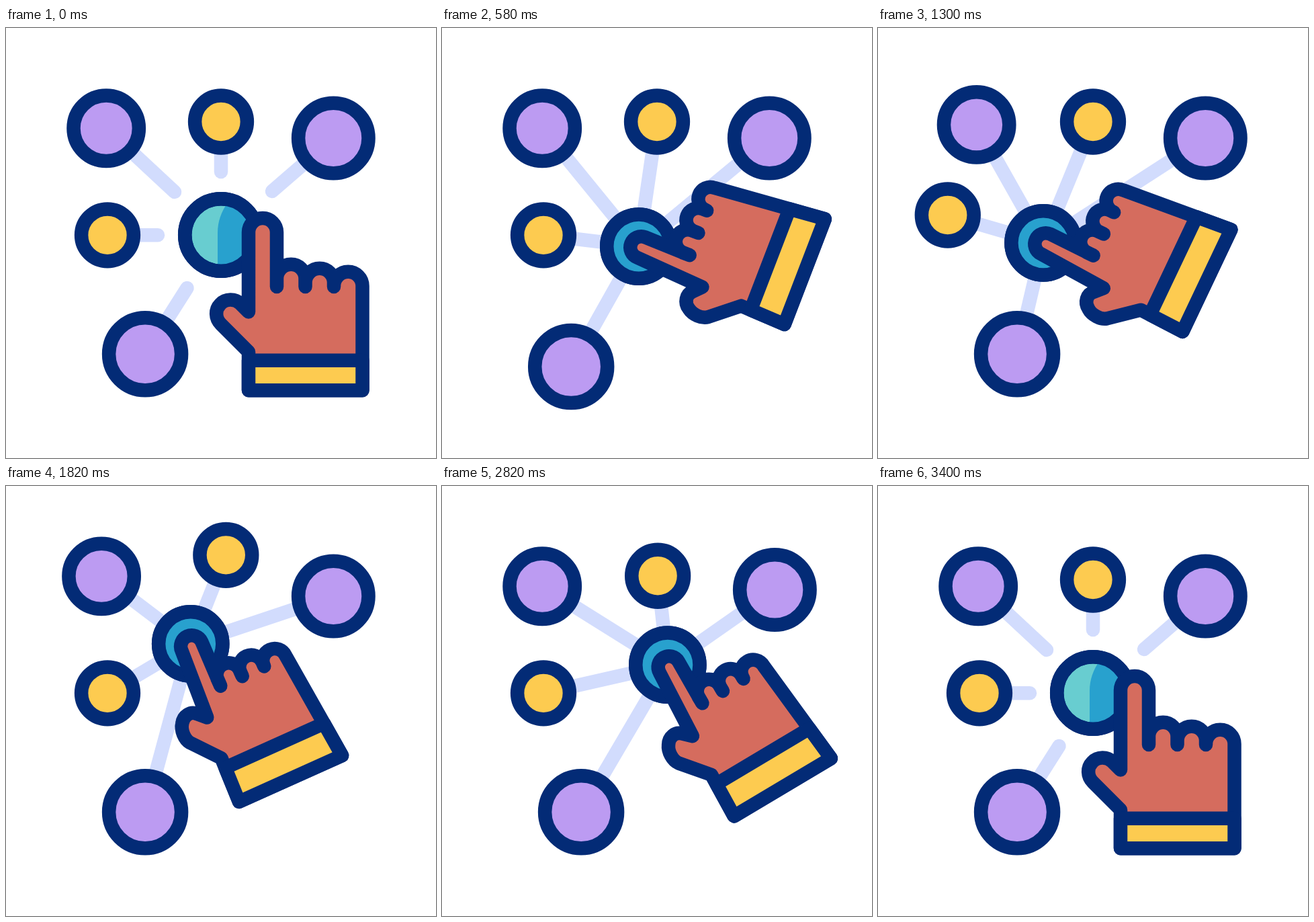
Recreate the animation shown at these times as an HTML page with a canvas. Size 640 px wide and 640 px high, loop 3600 ms.

```html
<!DOCTYPE html>
<html lang="en">
<head>
<meta charset="utf-8">
<title>Drag the hub</title>
<style>
  html, body { margin: 0; height: 100%; overflow: hidden; background: #fff; }
  canvas { display: block; }
</style>
</head>
<body>
<canvas id="stage" width="640" height="640"></canvas>
<script>
const ctx = document.getElementById('stage').getContext('2d');
const LOOP = 3600;
const NAVY = '#032b76', PURPLE = '#bc9bf2', YELLOW = '#fdcb50', RED = '#d56c5e';
const SPOKE = '#d2dcfd', TEAL = '#68cdd0', BLUE = '#28a1ce';
const LINE = 20.5;

// Nodes: rest place, radius, spoke end at rest, push vector, push start / peak / end
const nodes = [
  { x: 149.2, y: 149.2, r: 48.7, fill: PURPLE, end: [251, 244], push: [-17, -35.5], times: [1200, 1600, 2000] },
  { x: 320, y: 139.5, r: 38.9, fill: YELLOW, end: [320, 214], push: [12.6, -63], times: [1600, 2000, 3020] },
  { x: 487.3, y: 164, r: 52.2, fill: PURPLE, end: [396, 243], push: [39.5, -46.5], times: [2000, 2400, 3000] },
  { x: 151, y: 308.3, r: 38.9, fill: YELLOW, end: [226, 308.3], push: [-55.5, -35], times: [800, 1200, 1600] },
  { x: 207.1, y: 485.3, r: 54, fill: PURPLE, end: [269.5, 387], push: [-35, 44], times: [400, 800, 1200] }
];

// Hub path: time, x, y, hand angle in degrees
const keys = [
  [0, 320, 308, 0], [400, 320, 308, -72], [580, 293, 325, -69], [800, 258, 360, -67.5],
  [1060, 243, 352, -67], [1300, 246, 320, -64.65], [1600, 228, 250, -47],
  [1820, 274.5, 235, -24.3], [2000, 325, 222, -3], [2300, 399, 208, 23],
  [2420, 404, 210, 25], [2820, 336, 266, -30.7], [3000, 322, 300, -45], [3400, 320, 308, 0]
];

// Hand outlines around the hub centre: at rest and pressing
const hand = [
  'M41 231.2L41 174L0 133C-9 124 -9 111 -1 103C7 94.5 21 94.5 29 102.5L41 114.5L41 -4A21 21 0 0 1 83 -4L83 77L83 65A21.2 21.2 0 0 1 125.5 65L125.5 77L125.5 71A21.2 21.2 0 0 1 168 71L168 77L168 76A21.2 21.2 0 0 1 210.5 76L210.5 231.2Z',
  'M-30.5 244L-28 174L-61 134C-67 126 -66 111 -60 103C-54 93 -41 91 -34 99L-22.5 110L-16.3 4A16.3 16.3 0 0 1 16.3 4L15 75.5L15 64A17.8 17.8 0 0 1 50.5 64L50.5 75.5L50.5 68.5A17.8 17.8 0 0 1 86.2 68.5L86.2 75.5L86.2 74A17.8 17.8 0 0 1 121.8 74L137.5 244Z'
];
const cuff = [
  'M41 186.8L210.5 186.8L210.5 231.2L41 231.2Z',
  'M-28.5 189.4L132.5 189.4L137.5 244L-30.5 244Z'
];
const shade = new Path2D('M-5 60L-5 -3C-5 -20 0 -34 11 -50L130 -50L130 60Z');

const mix = (a, b, k) => a + (b - a) * k;
const ease = (t, from, to) => {
  const p = Math.min(1, Math.max(0, (t - from) / (to - from)));
  return (1 - Math.cos(Math.PI * p)) / 2;
};

function morph([from, to], k) {
  const number = /-?\d+(\.\d+)?/g, goal = to.match(number);
  let i = 0;
  return new Path2D(from.replace(number, n => mix(+n, +goal[i++], k)));
}

// Monotone cubic through the keys
function track(t, c) {
  const rate = i => (keys[i + 1][c] - keys[i][c]) / (keys[i + 1][0] - keys[i][0]);
  const slope = i => {
    if (i === 0 || i === keys.length - 1) return 0;
    const a = rate(i - 1), b = rate(i);
    return a * b <= 0 ? 0 : 2 * a * b / (a + b);
  };
  let i = 0;
  while (i < keys.length - 2 && t >= keys[i + 1][0]) i++;
  const span = keys[i + 1][0] - keys[i][0];
  const p = Math.min(1, (t - keys[i][0]) / span), q = 1 - p;
  return keys[i][c] * (1 + 2 * p) * q * q + keys[i + 1][c] * p * p * (3 - 2 * p)
    + span * p * q * (slope(i) * q - slope(i + 1) * p);
}

function shape(path, fill) {
  ctx.fillStyle = fill;
  ctx.fill(path);
  ctx.strokeStyle = NAVY;
  ctx.stroke(path);
}

function disc(x, y, r) {
  const path = new Path2D();
  path.arc(x, y, r, 0, 2 * Math.PI);
  return path;
}

function draw(t) {
  const press = ease(t, 0, 400) - ease(t, 3000, 3400);
  const x = track(t, 1), y = track(t, 2);

  ctx.fillStyle = '#fff';
  ctx.fillRect(0, 0, 640, 640);
  ctx.lineWidth = LINE;
  ctx.lineCap = ctx.lineJoin = 'round';

  const placed = nodes.map(n => {
    const [start, peak, end] = n.times;
    const k = ease(t, start, peak) - ease(t, peak, end);
    return { ...n, x: n.x + n.push[0] * k, y: n.y + n.push[1] * k };
  });
  ctx.strokeStyle = SPOKE;
  for (const n of placed) {
    ctx.beginPath();
    ctx.moveTo(n.x, n.y);
    ctx.lineTo(mix(n.end[0], x, press), mix(n.end[1], y, press));
    ctx.stroke();
  }
  for (const n of placed) shape(disc(n.x, n.y, n.r), n.fill);

  ctx.save();
  ctx.translate(x, y);
  const hub = disc(0, 0, mix(53.8, 47.6, press));
  shape(hub, TEAL);
  ctx.save();
  ctx.clip(hub);
  ctx.translate(-60 * press, 0);
  ctx.fillStyle = BLUE;
  ctx.fill(shade);
  ctx.restore();
  ctx.stroke(hub);

  ctx.rotate(track(t, 3) * Math.PI / 180);
  shape(morph(hand, press), RED);
  shape(morph(cuff, press), YELLOW);
  ctx.restore();
}

const begin = performance.now();
function tick() {
  draw((performance.now() - begin) % LOOP);
  requestAnimationFrame(tick);
}
tick();
</script>
</body>
</html>
```
